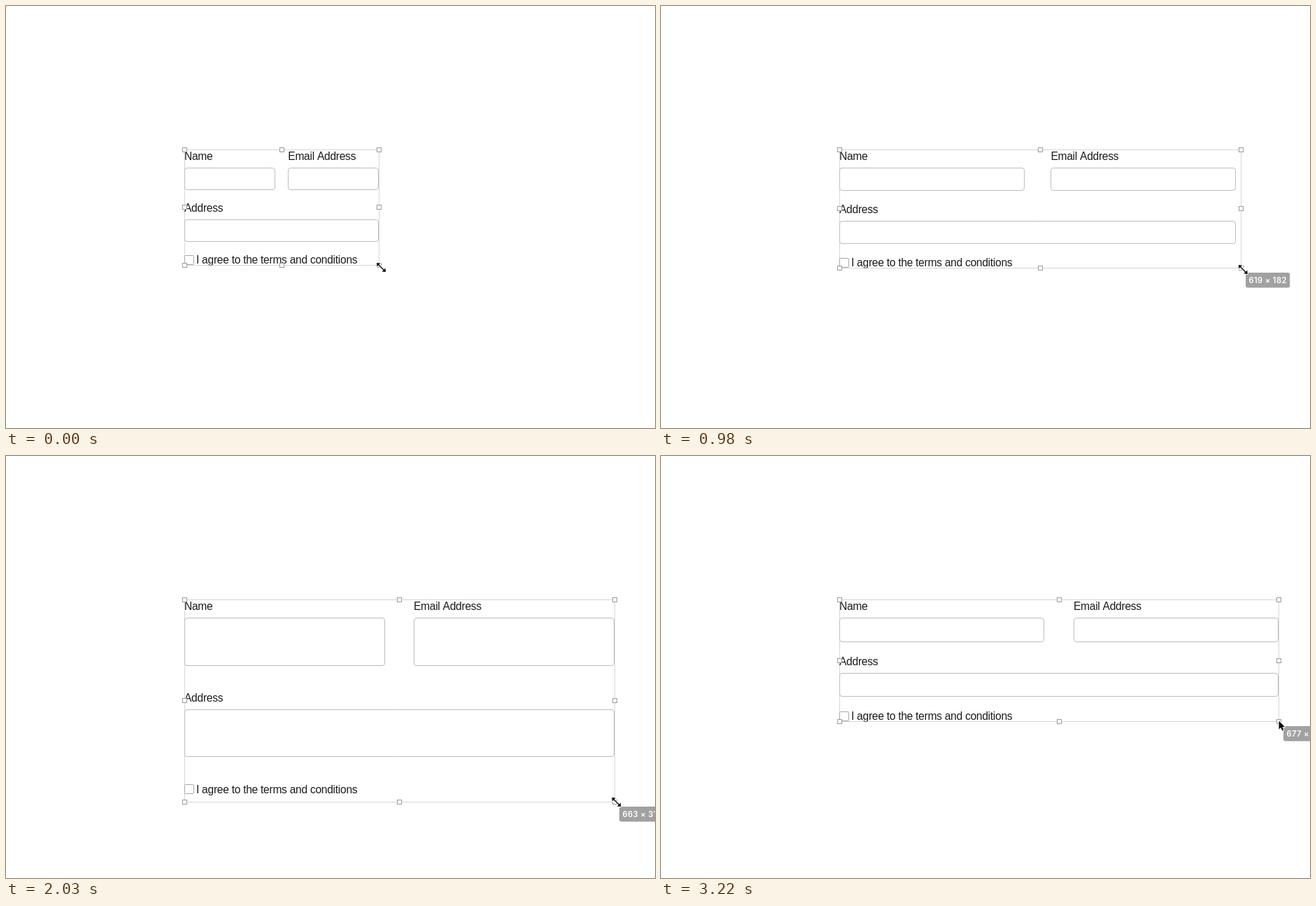
Animation of 928x603 px, one loop 3290 ms. Source, as an HTML page with a canvas:

```html
<!DOCTYPE html>
<html lang="en">
<head>
<meta charset="utf-8">
<title>Responsive form resize</title>
<style>
  html, body { margin: 0; width: 100%; height: 100%; overflow: hidden; background: #fff; }
  canvas { display: block; }
</style>
</head>
<body>
<canvas id="stage" width="928" height="603"></canvas>
<script>
const ctx = document.getElementById('stage').getContext('2d');
const LOOP = 3290, STEP = 70;
const DRAG_START = 5, DRAG_END = 45;
const LEFT = 255, TOP = 205, BASE_BOTTOM = 370, SCALE = 0.9283;

// Key positions of the dragged corner: [step, value], eased out between keys
const RIGHT = [[4, 533], [8, 733], [9, 760], [13, 822], [14, 829.2], [20, 846],
  [21, 862], [29, 870], [34, 883]];
const BOTTOM = [[9, 370], [13, 374], [14, 374], [20, 387], [21, 476], [24, 495],
  [28, 483.5], [29, 494], [30, 494], [33, 400], [34, 397], [36, 397], [43, 379]];

function track(keys, step) {
  const i = keys.findIndex(key => key[0] > step);
  if (i === 0) return keys[0][1];
  if (i < 0) return keys[keys.length - 1][1];
  const [s0, v0] = keys[i - 1], [s1, v1] = keys[i];
  const k = (step - s0) / (s1 - s0);
  return v0 + (v1 - v0) * k * (2 - k);
}

function corner(step) {
  return { x: track(RIGHT, step), y: track(BOTTOM, step) };
}

function roundRect(x, y, w, h, r) {
  ctx.beginPath();
  ctx.roundRect(x, y, w, h, r);
}

function polygon(points) {
  ctx.beginPath();
  points.forEach(([x, y]) => ctx.lineTo(x, y));
  ctx.closePath();
}

function text(str, x, midY) {
  ctx.fillText(str, x, midY + 5);
}

function field(x, y, w, h) {
  const x0 = Math.round(x) + 0.5, y0 = Math.round(y) + 0.5;
  roundRect(x0, y0, Math.round(x + w) - x0 - 0.5, Math.round(y + h) - y0 + 0.5, 3.5);
  ctx.stroke();
}

function drawForm(size, box) {
  const w = size.x - LEFT, grow = size.y - BASE_BOTTOM;
  const half = w * 7 / 15, second = LEFT + w * 8 / 15;
  const inputH = 31 + grow * 0.322, row = 74 + grow / 2;
  ctx.save();
  ctx.beginPath();
  ctx.rect(LEFT - 1, TOP, box.x - LEFT + 2, box.y - TOP + 0.5);
  ctx.clip();
  ctx.font = '15.6px "Liberation Sans", Arial, sans-serif';
  ctx.letterSpacing = '-0.28px';
  ctx.fillStyle = '#1c1c1c';
  ctx.strokeStyle = '#bdbdbd';
  ctx.lineWidth = 1;
  text('Name', LEFT, 215);
  text('Email Address', second, 215);
  field(LEFT, 231, half, inputH);
  field(second, 231, half, inputH);
  text('Address', LEFT, 215 + row);
  field(LEFT, 231 + row, w, inputH);
  const check = 215 + row * 2;
  text('I agree to the terms and conditions', 272, check);
  ctx.strokeStyle = '#a6a6a6';
  roundRect(LEFT + 0.5, Math.round(check - 7.5) + 0.5, 13, 13, 1);
  ctx.stroke();
  ctx.restore();
}

function drawOutline(box) {
  ctx.lineWidth = 1;
  ctx.strokeStyle = '#d6d6d6';
  ctx.strokeRect(LEFT + 0.5, TOP + 0.5, Math.round(box.x) - LEFT, Math.round(box.y) - TOP);
}

function drawHandles(box) {
  const r = Math.round(box.x), b = Math.round(box.y);
  const midX = Math.floor((LEFT + r) / 2), midY = Math.floor((TOP + b) / 2);
  ctx.lineWidth = 1;
  ctx.strokeStyle = '#9a9a9a';
  ctx.fillStyle = '#fff';
  for (const x of [LEFT, midX, r]) {
    for (const y of [TOP, midY, b]) {
      if (x === midX && y === midY) continue;
      ctx.fillRect(x - 2.5, y - 2.5, 6, 6);
      ctx.strokeRect(x - 2.5, y - 2.5, 6, 6);
    }
  }
}

function drawLabel(box) {
  const x = Math.round(box.x) + 7, y = Math.round(box.y) + 7;
  const w = Math.round((box.x - LEFT) / SCALE), h = Math.round((box.y - TOP) / SCALE);
  const str = `${w} × ${h}`;
  ctx.save();
  ctx.font = '600 11.2px Inter, Roboto, sans-serif';
  ctx.letterSpacing = '0.35px';
  ctx.fillStyle = '#a1a1a1';
  roundRect(x, y, ctx.measureText(str).width + 9, 21.5, 3);
  ctx.fill();
  ctx.fillStyle = '#fff';
  ctx.fillText(str, x + 4.5, y + 14.8);
  ctx.restore();
}

function drawResize(x, y) {
  const head = [[-6.5, -6.5], [-1, -6], [-6, -1]];
  ctx.save();
  ctx.translate(x, y);
  ctx.lineJoin = 'round';
  for (const [color, extra] of [['#fff', 2], ['#111', 0]]) {
    ctx.strokeStyle = ctx.fillStyle = color;
    ctx.lineWidth = 1.6 + extra;
    ctx.beginPath();
    ctx.moveTo(-4, -4);
    ctx.lineTo(4, 4);
    ctx.stroke();
    for (const side of [1, -1]) {
      polygon(head.map(([px, py]) => [px * side, py * side]));
      ctx.fill();
      if (extra) {
        ctx.lineWidth = extra;
        ctx.stroke();
      }
    }
  }
  ctx.restore();
}

function drawPointer(x, y) {
  ctx.save();
  ctx.translate(x, y);
  polygon([[0, 0], [0, 12], [2.7, 9.5], [4.7, 14], [6.8, 13.1], [4.9, 8.8], [8.5, 8.6]]);
  ctx.lineJoin = 'round';
  ctx.lineWidth = 2;
  ctx.strokeStyle = '#fff';
  ctx.stroke();
  ctx.fillStyle = '#0c0c0c';
  ctx.fill();
  ctx.restore();
}

function drawCursor(step, box) {
  if (step >= DRAG_END) return drawPointer(box.x + 0.5, box.y - 0.5);
  // The cursor runs half a step ahead of the box once dragging
  const next = corner(step + 1);
  const lead = step < DRAG_START ? 0 : 0.5;
  const rest = 0.5 + Math.max(0, 3 - step);
  drawResize(box.x + rest + (next.x - box.x) * lead,
             box.y + rest + (next.y - box.y) * lead);
}

function draw(step) {
  const box = corner(step);
  ctx.fillStyle = '#fff';
  ctx.fillRect(0, 0, 928, 603);
  drawOutline(box);
  drawForm(corner(step - 1), box); // layout trails the drag by one step
  drawHandles(box);
  if (step >= DRAG_START) drawLabel(box);
  drawCursor(step, box);
}

const start = performance.now();
function tick(now) {
  draw(Math.floor((Math.max(0, now - start) % LOOP) / STEP));
  requestAnimationFrame(tick);
}
draw(0);
requestAnimationFrame(tick);
</script>
</body>
</html>
```
